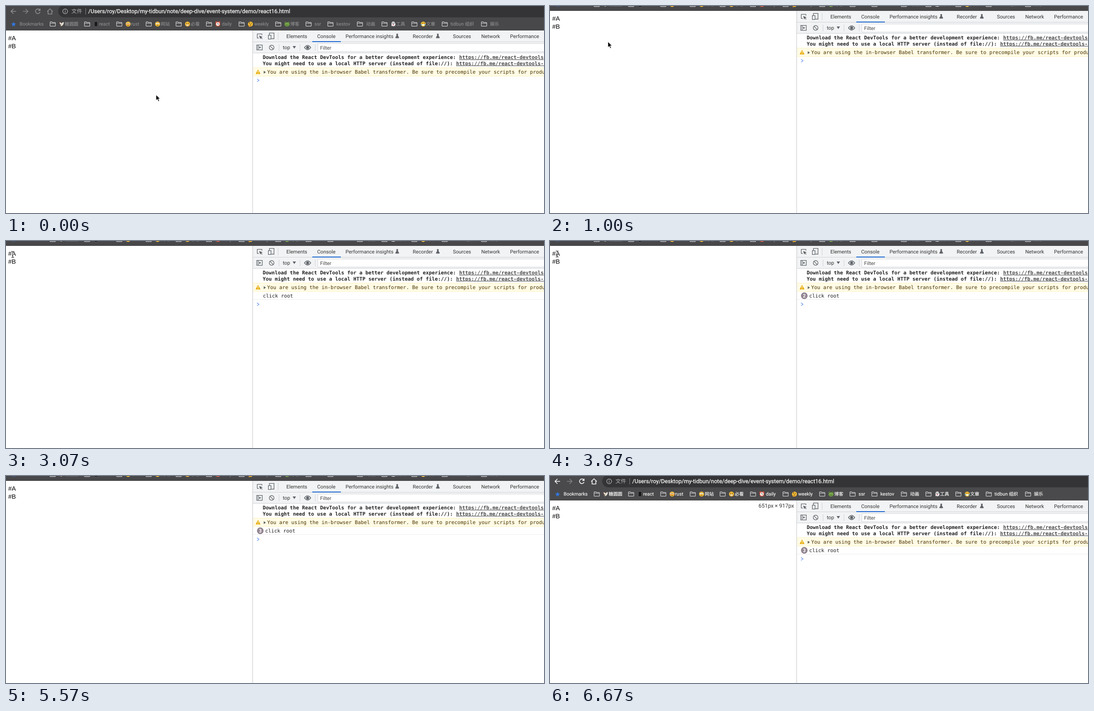
An HTML page that plays this animation: 1205x465 px, repeating every 6.71 s.

```html
<!DOCTYPE html>
<html lang="zh">
<head>
<meta charset="utf-8">
<title>Event demo</title>
<style>
html, body { margin: 0; width: 100%; height: 100%; overflow: hidden; background: #fff; }
svg { display: block; width: 1205px; height: 465px; overflow: hidden; }
text { font-family: Roboto, "Noto Sans CJK SC", "Noto Sans CJK", sans-serif; text-rendering: geometricPrecision; white-space: pre; }
.mono { font-family: "DejaVu Sans Mono", monospace; font-size: 11.24px; fill: #222; }
.bold { font-weight: 700; }
.link { text-decoration: underline; fill: #4a4a4a; }
.tab { font-size: 11.25px; fill: #333; }
.page { font-family: "Liberation Sans", sans-serif; font-size: 14px; fill: #000; }
.url { font-size: 12.54px; fill: #fff; stroke: #fff; stroke-width: .25; }
.mark { font-size: 10.65px; fill: var(--label); stroke: var(--label); stroke-width: .2; }
.cjk { font-family: "Noto Sans CJK SC", "Noto Sans CJK", sans-serif; font-size: 10.2px; }
.icon { fill: none; stroke: #5f6368; stroke-width: 1.3; }
.nav { fill: none; stroke: var(--nav); stroke-width: 1.6; }
</style>
</head>
<body>
<svg viewBox="0 0 1205 465">
  <defs>
    <path id="folder" d="M.7 9.6V1.4Q.7.7 1.4.7H4.8L6.2 2.2H12Q12.7 2.2 12.7 2.9V9.6Q12.7 10.3 12 10.3H1.4Q.7 10.3.7 9.6ZM.7 4H12.7" fill="none" stroke="#d2d2d3" stroke-width="1.2"/>
    <path id="flask" d="M2.2.5H6.2M3 .5V4L.5 8.2Q.1 9.3 1.2 9.3H7.2Q8.3 9.3 7.9 8.2L5.4 4V.5Z" fill="#5f6368" stroke="#5f6368"/>
  </defs>
  <rect width="1205" height="465" fill="#fff"/>
  <g id="window">
    <rect id="bar" width="1205" height="55"/>
    <rect x="117" y="-2" width="1110" height="27.5" rx="13.7" fill="#343436"/>
    <g class="nav">
      <path d="M22.5 12H11.5M16.7 6.5 11.2 12 16.7 17.5"/>
      <path d="M38 12H49M43.8 6.5 49.3 12 43.8 17.5" stroke="#858587"/>
      <path d="M75.7 9A5.2 5.2 0 1 0 76.3 13.4M76.3 6V10.2H72"/>
      <path d="M92.3 12.3 98.5 6.3 104.7 12.3M94.3 11V18H102.7V11"/>
    </g>
    <g fill="none" stroke="#bdbdbf" stroke-width="1.2">
      <circle cx="132.5" cy="12" r="5.4"/><path d="M132.5 11.3V15M132.5 8.6V10"/>
    </g>
    <text class="cjk" x="146.5" y="16.3" style="font-size:12px" fill="#b5b5b7">文件</text>
    <path d="M178.5 5V19" stroke="#87878a"/>
    <text class="url" x="184.3" y="16.4">/Users/roy/Desktop/my-tidbun/note/deep-dive/event-system/demo/react16.html</text>
    <path d="M17 35.5 18.5 39.1 22.3 39.4 19.4 41.9 20.3 45.7 17 43.7 13.7 45.7 14.6 41.9 11.7 39.4 15.5 39.1Z" fill="#3277df"/>
    <text class="mark" x="30.5" y="44.2">Bookmarks</text>
    <g id="marks"></g>

    <text class="page" x="5" y="76.5">#A</text>
    <text class="page" x="5" y="95">#B</text>
    <text id="size" x="467" y="71" font-size="12.25" fill="#333">651px × 917px</text>

    <rect x="553" y="55" width="652" height="50" fill="#f1f3f4"/>
    <path d="M553 80.5H1205M553 105.5H1205" stroke="#cfd2d6"/>
    <path d="M552.5 55V520" stroke="#c3c5c8"/>
    <rect x="686" y="79" width="64" height="2" fill="#1a66d0"/>
    <g class="icon">
      <path d="M566 72H563.5Q562.7 72 562.7 71.2V63.5Q562.7 62.7 563.5 62.7H572.5Q573.3 62.7 573.3 63.5V65.5"/>
      <path d="M567 66.5 575 69.5 571.7 70.7 574.5 73.5 573.5 74.5 570.7 71.7 569.5 74.5Z" fill="#5f6368" stroke="none"/>
      <path d="M590 65V60.7H600.3V73.5H594.5"/><rect x="587.6" y="65.6" width="6" height="8.7"/>
      <path d="M609.5 60V76" stroke="#cfd2d6" stroke-width="1"/>
      <rect x="561.6" y="87.6" width="12.4" height="11"/><path d="M564.7 87.5V98.5"/>
      <path d="M567 90.5 571.5 93.1 567 95.7Z" fill="#5f6368" stroke="none"/>
      <circle cx="595" cy="93.3" r="5.3"/><path d="M591.3 89.6 598.7 97"/>
      <path d="M611.5 86V101M658.5 86V101M692.5 86V101" stroke="#cfd2d6" stroke-width="1"/>
      <path d="M642 90H649.5L645.75 95.8Z" fill="#5f6368" stroke="none"/>
      <path d="M668.5 93.2Q675.5 83.8 682.5 93.2 675.5 102.6 668.5 93.2Z" stroke-width="1.6"/><circle cx="675.5" cy="93.2" r="2.6" fill="#5f6368"/>
    </g>
    <rect x="698.5" y="84.5" width="520" height="18" fill="#fff" stroke="#d5d7da"/>
    <text class="tab" x="620" y="97">top</text>
    <text class="tab" x="703.5" y="97.8" style="fill:#444">Filter</text>
    <g id="tabs"></g>
    <use href="#flask" x="872" y="62.5"/><use href="#flask" x="963" y="62.5"/>

    <text class="mono bold" x="575" y="119">Download the React DevTools for a better development experience: </text>
    <text class="mono bold link" x="1015" y="119">https://fb.me/react-devtools</text>
    <text class="mono bold" x="575" y="132.7">You might need to use a local HTTP server (instead of file://): </text>
    <text class="mono bold link" x="1008.2" y="132.7">https://fb.me/react-devtools-faq</text>
    <rect x="553" y="138.5" width="652" height="19" fill="#fffbe5"/>
    <path d="M553 138.5H1205M553 157.5H1205" stroke="#fff3c4"/>
    <path d="M564.5 143.3 569.3 152.3H559.7Z" fill="#e8ae10" stroke="#e8ae10" stroke-linejoin="round"/>
    <path d="M564.5 145.6V149.2M564.5 150.3V151.7" stroke="#fff" stroke-width="1.3"/>
    <path d="M577.3 145.5 582 148.7 577.3 152Z" fill="#5f5f5f"/>
    <text class="mono" x="585" y="152" style="fill:#4a3300">You are using the in-browser Babel transformer. Be sure to precompile your scripts for production</text>
    <g id="log">
      <text id="message" class="mono" y="171">click root</text>
      <path d="M553 175.5H1205" stroke="#ececec"/>
      <g id="badge">
        <circle cx="569.5" cy="167" r="7.4" fill="#91838f"/>
        <text id="count" class="bold" x="569.5" y="171" font-size="11.3" text-anchor="middle" fill="#fff"></text>
      </g>
    </g>
    <path id="prompt" d="M562.3 163.7 566.7 167 562.3 170.3" fill="none" stroke="#6f9af0" stroke-width="1.4"/>
  </g>
  <path id="arrow" d="M0 0V13.5L3.1 10.7 5.2 15.6 7.6 14.6 5.5 9.8H9.7Z" fill="#000" stroke="#fff" stroke-width="1.1"/>
  <g id="beam" fill="none">
    <path d="M-3-7Q0-7 0-5 0-7 3-7M0-5V5M-3 7Q0 7 0 5 0 7 3 7M-1.5 2.5H1.5" stroke="#fff" stroke-width="2.4"/>
    <path d="M-3-7Q0-7 0-5 0-7 3-7M0-5V5M-3 7Q0 7 0 5 0 7 3 7M-1.5 2.5H1.5" stroke="#222" stroke-width="1.1"/>
  </g>
</svg>
<script>
const LOOP = 6710;
const HIDE = [40, 300], SHOW = [5600, 5715];
const CLICKS = [2300, 3700, 5100];
const BEAM_FROM = 1300, GONE = 5590;
// time, x, y of the pointer
const PATH = [
  [450, 336, 199], [730, 270, 135], [1000, 130, 80], [1300, 28, 40], [1530, 21, 35],
  [1750, 16, 31], [2860, 16, 31], [3000, 15, 30], [3600, 15, 30], [3750, 16, 29],
  [4300, 16, 29], [4500, 17, 27], [5330, 17, 27], [5590, 24, -12]
];

const $ = id => document.getElementById(id);
const show = (id, on) => $(id).setAttribute('display', on ? 'inline' : 'none');
const move = (id, x, y) => $(id).setAttribute('transform', `translate(${x} ${y})`);
const clamp = v => Math.max(0, Math.min(1, v));
const ease = v => v * v * (3 - 2 * v);
const progress = (t, [from, to]) => ease(clamp((t - from) / (to - from)));

const line = (d, color = '#4b3510', width = 1) =>
  `<path d="${d}" fill="none" stroke="${color}" stroke-width="${width}"/>`;
const disc = (x, y, r, color) => `<circle cx="${x}" cy="${y}" r="${r}" fill="${color}"/>`;
const eyes = disc(-2, -1.3, .9, '#4b3510') + disc(2, -1.3, .9, '#4b3510');
const face = detail => disc(0, 0, 5.6, '#f5bd36') + detail;

// small pictures centred on 0,0
const pictures = {
  bird: `<path d="M-5-4Q-1-4 0-1Q2-5 5-4Q5 1 1 4L-2 5-1 2Q-4 1-5-4Z" fill="#e4dfd5"/>` +
    line('M-4 4 0 1', '#b88b52') + disc(-4, -3, 1, '#d66b45'),
  phone: `<rect x="-3.5" y="-5.5" width="7" height="11" rx="1" fill="#19191b" stroke="#777" stroke-width=".6"/>`,
  blush: face(disc(-2.2, -1.3, 1.7, '#fff') + disc(2.2, -1.3, 1.7, '#fff') + eyes +
    disc(-3.4, 1.6, 1.4, '#eb8150') + disc(3.4, 1.6, 1.4, '#eb8150') + line('M-1.5 3H1.5')),
  roll: face(disc(-2, -1.3, 1.8, '#fff') + disc(2, -1.3, 1.8, '#fff') +
    disc(-1.6, -2.3, .8, '#4b3510') + disc(2.4, -2.3, .8, '#4b3510') + line('M-2 2.7H2')),
  grin: face(eyes + '<path d="M-3.5 1H3.5Q2.5 4 0 4T-3.5 1Z" fill="#fff" stroke="#9a5a1c" stroke-width=".5"/>'),
  clock: disc(-3.5, -4, 2, '#d9533f') + disc(3.5, -4, 2, '#d9533f') + disc(0, 0, 5.4, '#d9533f') +
    disc(0, 0, 3.9, '#f4f0ea') + line('M0-2.8V0L2 1.3', '#333') + line('M-3 4.5-4.3 6M3 4.5 4.3 6', '#d9533f'),
  think: face(eyes + line('M-3.5-3.5-1-3.8M-1.5 2H2') +
    '<path d="M-4 6-3 2.5 1 3.3-1 6Z" fill="#e39b2c"/>'),
  frog: disc(-3.3, -3.2, 2, '#78a64a') + disc(3.3, -3.2, 2, '#78a64a') +
    '<ellipse cy="1" rx="5.6" ry="4.5" fill="#78a64a"/>' + disc(-3.3, -3.4, .9, '#222') +
    disc(3.3, -3.4, .9, '#222') + line('M-3.5 2Q0 4 3.5 2', '#33521f'),
  ghost: '<path d="M-4 5V-1Q-4-5.5 0-5.5T4-1L5.5 0 4 2V5L2 4 0 5.5-2 4Z" fill="#eeeef0"/>' +
    disc(-1.5, -2, .9, '#333') + disc(1.5, -2, .9, '#333') + disc(0, 1, 1.3, '#b8404d'),
  laugh: face(line('M-3.5-1.5-2-2.5-1-1.5M1-1.5 2-2.5 3.5-1.5') +
    '<path d="M-3 .5H3Q2 4 0 4T-3 .5Z" fill="#fff"/>' + disc(-4.2, 1.5, 1.4, '#54a9e0') + disc(4.2, 1.5, 1.4, '#54a9e0'))
};

// folder x, label x, label, picture
const bookmarks = [
  [98, 131.5, '糖圆圆', 'bird'], [175, 208.5, 'react', 'phone'], [247, 280, 'rust', 'blush'],
  [313, 346.5, '网站', 'roll'], [380, 413.5, '必看', 'grin'], [448, 483.5, 'daily', 'clock'],
  [521, 556, 'weekly', 'think'], [603, 636.5, '博客', 'frog'], [671, 691, 'ssr'],
  [720, 740, 'kestov'], [786, 806.5, '动画'], [841, 873.5, '工具', 'ghost'],
  [908, 941, '文章', 'laugh'], [976, 995.5, 'tidbun 组织'], [1064, 1084, '娱乐']
];
const styled = label => label.replace(/[\u4e00-\u9fff]+/, s => `<tspan class="cjk">${s}</tspan>`);
$('marks').innerHTML = bookmarks.map(([x, tx, label, pic]) =>
  `<use href="#folder" x="${x}" y="35"/><text class="mark" x="${tx}" y="44.2">${styled(label)}</text>` +
  (pic ? `<g transform="translate(${x + 26.5} 40.5)">${pictures[pic]}</g>` : '')
).join('');

const tabs = [[628, 'Elements'], [697, 'Console'], [760.5, 'Performance insights'], [911, 'Recorder'],
  [1001, 'Sources'], [1064.5, 'Network'], [1129, 'Performance']];
$('tabs').innerHTML = tabs.map(([x, name]) => `<text class="tab" x="${x}" y="71.8">${name}</text>`).join('');

function pointer(t) {
  const next = PATH.findIndex(p => p[0] > t);
  if (next === 0) return PATH[0].slice(1);
  if (next < 0) return PATH[PATH.length - 1].slice(1);
  const [t0, x0, y0] = PATH[next - 1], [t1, x1, y1] = PATH[next];
  const k = (t - t0) / (t1 - t0);
  return [x0 + (x1 - x0) * k, y0 + (y1 - y0) * k];
}

function draw(t) {
  move('window', 0, -44 * (progress(t, HIDE) - progress(t, SHOW)));

  const active = t >= SHOW[0];
  const root = document.documentElement.style;
  root.setProperty('--nav', active ? '#fff' : '#929294');
  root.setProperty('--label', active ? '#f4f4f4' : '#88888a');
  $('bar').setAttribute('fill', active ? '#4a4a4c' : '#48484a');
  show('size', t >= SHOW[0] + 50);

  const clicks = CLICKS.filter(c => t >= c).length;
  show('log', clicks > 0);
  show('badge', clicks > 1);
  $('count').textContent = clicks;
  $('message').setAttribute('x', clicks > 1 ? 580.5 : 575.5);
  move('prompt', 0, clicks ? 19.2 : 0);

  const [x, y] = pointer(t);
  const beam = t >= BEAM_FROM;
  show('arrow', !beam);
  show('beam', beam && t < GONE);
  move('arrow', x, y);
  move('beam', x, y);
}

const start = performance.now();
function tick() {
  draw((performance.now() - start) % LOOP);
  requestAnimationFrame(tick);
}
draw(0);
requestAnimationFrame(tick);
</script>
</body>
</html>
```
